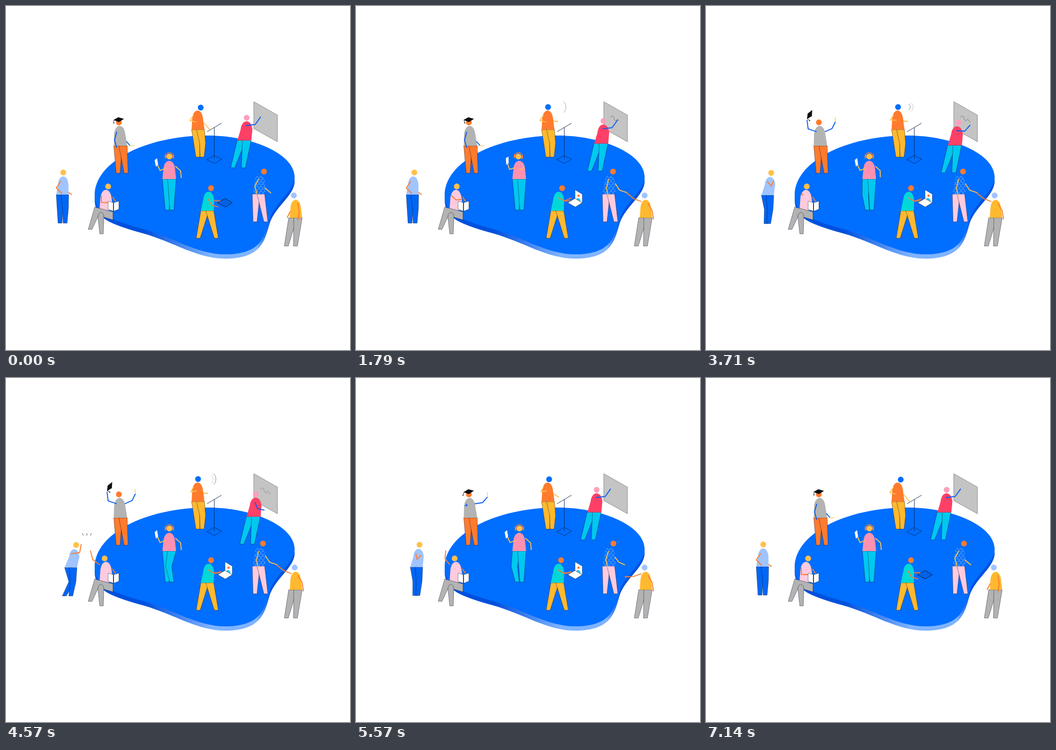
An HTML page with a canvas that plays this animation: 640x640 px, repeating every 7210 ms.

```html
<!DOCTYPE html>
<html lang="en">
<head>
<meta charset="utf-8">
<title>People around a shared space</title>
<style>
html, body { margin: 0; width: 100%; height: 100%; overflow: hidden; background: #fff; }
canvas { display: block; }
</style>
</head>
<body>
<canvas width="640" height="640"></canvas>
<script>
const ctx = document.querySelector('canvas').getContext('2d');
const LOOP = 7210, STEP = LOOP / 101, TAU = 2 * Math.PI;
const BLUE = '#006eff', ORANGE = '#ff7b2e', YELLOW = '#ffb92e', SKIN = '#ffc04a', GRAY = '#b3b3b3', CYAN = '#00c8f0',
  SLEEVE = '#0a5cf0', PALE_BLUE = '#a0c4ff', PALE_PINK = '#ffcadd', INK = 'rgba(10,20,50,.75)';
let t = 0;

// Motion: every gesture is a weight that eases in, holds and eases out.
function ease(from, to) {
  const p = Math.max(0, Math.min(1, (t - from) / (to - from)));
  return p * p * (3 - 2 * p);
}
const during = (inStart, inEnd, outStart, outEnd) => ease(inStart, inEnd) * (1 - ease(outStart, outEnd));
const wave = cycles => Math.sin(TAU * cycles * t / LOOP);
const mix = (a, b, w) => a.map((v, i) => v + (b[i] - v) * w);

// Drawing primitives
function paint(path, fill, stroke, width = .6) {
  if (fill) { ctx.fillStyle = fill; ctx.fill(path); }
  if (stroke) { ctx.strokeStyle = stroke; ctx.lineWidth = width; ctx.stroke(path); }
}

function track(pts) {
  const path = new Path2D();
  for (let i = 0; i < pts.length; i += 2) path.lineTo(pts[i], pts[i + 1]);
  return path;
}

const line = (pts, color, width = 1.8) => paint(track(pts), null, color, width);

function poly(pts, fill, stroke = INK, width) {
  const path = track(pts);
  path.closePath();
  paint(path, fill, stroke, width);
}

function dot(x, y, color, r = 5.4) {
  const path = new Path2D();
  path.arc(x, y, r, 0, TAU);
  paint(path, color);
}

function placed(x, y, angle, draw) {
  ctx.save();
  ctx.translate(x, y);
  ctx.rotate(angle);
  draw();
  ctx.restore();
}

// Body parts
function leg(hipLeft, hipRight, hip, foot, floor, knee, color) {
  const middle = (hip + floor) / 2, left = foot - 3.7, right = foot + 3.7;
  poly([hipLeft, hip, hipRight, hip, (hipRight + right) / 2 + knee, middle, right, floor,
    left, floor, (hipLeft + left) / 2 + knee, middle], color);
}

function legs(color, x, hip, width, floor, leftFoot, rightFoot, leftKnee = 0, rightKnee = 0) {
  leg(x - width / 2, x + width * .12, hip, leftFoot, floor, leftKnee, color);
  leg(x - width * .12, x + width / 2, hip, rightFoot, floor, rightKnee, color);
}

function torsoPath(x, hip, width, height, lean) {
  const shoulder = hip - height * .58, dome = hip - height * 1.14, half = width * .42, top = x + lean;
  return new Path2D(`M${x - width / 2} ${hip}L${top - half} ${shoulder}C${top - half + 2} ${dome}` +
    ` ${top + half - 2} ${dome} ${top + half} ${shoulder}L${x + width / 2} ${hip}Z`);
}
const torso = (color, ...body) => paint(torsoPath(...body), color);

// An arm is shoulder, hand and how far the elbow sticks out sideways.
function arm(color, [x, y, handX, handY, bend]) {
  const dx = handX - x, dy = handY - y, k = bend / (Math.hypot(dx, dy) || 1);
  line([x, y, (x + handX) / 2 - dy * k, (y + handY) / 2 + dx * k, handX, handY], color);
}

const reach = ([x, y, handX, handY, bend], dx, dy) => [x, y, handX + dx, handY + dy, bend];

const island = new Path2D('M165 352C165 290 260 241 375 241C460 241 537 276 537 318C537 345 500 365 490 398' +
  'C481 430 474 462 408 462C355 462 315 432 255 415C195 398 165 388 165 352Z');
const rim = ctx.createLinearGradient(165, 0, 537, 0);
[[.25, '#0050dd'], [.58, '#7fb4ff'], [.81, '#7fb4ff'], [.88, '#0052dd']]
  .forEach(([at, color]) => rim.addColorStop(at, color));

function ground() {
  placed(0, 8, 0, () => paint(island, rim));
  paint(island, BLUE);
}

function graduate() {
  const raise = during(2430, 2860, 5600, 6200), salute = during(2430, 2860, 5200, 5950);
  const doff = during(3000, 3500, 4700, 5200);
  legs(ORANGE, 213, 260, 25, 311, 208.7, 223.5);
  torso(GRAY, 213, 260, 25, 37, -1.5);
  dot(210, 216.5, ORANGE);
  arm(SLEEVE, reach(mix([206, 234, 206, 264, 4], [206, 234, 199, 212, -9], salute), -11 * doff, 0));
  const right = reach(mix([224, 252, 231, 260, 0], [221, 234, 245, 221, 5], raise), -4 * doff, -6 * doff);
  arm(SLEEVE, right);
  placed(right[2], right[3], -1.65 * raise, () => line([-1, 0, 8, 0], '#ffd27a', 1.6));
  placed(209.5 - 16.5 * doff, 211.5 - 9 * doff, -.1 * salute - .85 * doff, () => {
    const tip = -9 - 1.8 * wave(3);
    poly([-9.5, .5, -.5, -4.5, 10, -1.5, .5, 4.5], '#0a0f14', null);
    line([-8.5, .5, tip, 6], '#0a0f14', .8);
    dot(tip, 6, '#0a0f14', 1);
  });
}

function soundWaves(start, repeats) {
  const PERIOD = 650, since = t - start;
  if (since < 0 || since > repeats * PERIOD) return;
  for (let i = 0; i < 3; i++) {
    const age = since % PERIOD - i * 130, x = 377 + 4.5 * i, half = 5.8 + 2.3 * i, bulge = 4 + i;
    ctx.globalAlpha = Math.max(0, Math.min(1, age / 120, (400 - age) / 150));
    paint(new Path2D(`M${x} ${188 - half}c${bulge} ${half / 2} ${bulge} ${half * 1.5} 0 ${half * 2}`), null, '#777', .8);
  }
  ctx.globalAlpha = 1;
}

function speaker() {
  const gesture = during(3200, 4000, 5600, 6300), turn = during(0, 900, 5000, 6300);
  legs(YELLOW, 357.3, 230, 24, 281, 357, 364.8, 0, 2.5);
  torso(ORANGE, 357.3, 230, 24, 35.5, -.8);
  dot(362.3 - 5 * turn, 189 - turn, BLUE);
  arm(SKIN, mix([349, 203, 354, 216, 10], [349, 202, 355, 210, 9.6], gesture));
  arm(SKIN, mix([368, 217, 379, 230, 0], [367, 214, 376, 215, 0], during(300, 1500, 5000, 6200)));
  line([374, 234, 401, 218], '#222c44', .9);
  line([387.5, 226, 387.5, 285], '#0a2a66', .9);
  poly([373.5, 286, 387, 278, 401, 285, 388, 293], null, '#0a2a66', .8);
  soundWaves(590, 3);
  soundWaves(3450, 2);
}

const scribble = new Path2D('M473 207C477 203 479 204 480 209C481 214 484 215 486 211C489 209 488 216 492 216');

function presenter() {
  poly([461, 178, 505, 203, 505, 252.5, 461, 228], '#c4c4c4', '#888', .9);
  ctx.save();
  ctx.globalAlpha = 1 - ease(4300, 5100);
  ctx.setLineDash([40 * ease(600, 2600), 99]);
  if (t > 640) paint(scribble, null, '#777', .9);
  ctx.restore();
  const step = 19.5 * during(250, 2800, 4300, 5500);
  placed(step, step * .47, 0, () => {
    legs(CYAN, 443, 250, 26, 301, 421.7, 441.7);
    torso('#ff4066', 443.5, 250, 26, 35.5, 4);
    dot(447.7 + 2.5 * during(2200, 2800, 3500, 4400), 208, '#ff9fbc');
    arm(SLEEVE, mix([446, 222.5, 474, 206, 7.2], [446, 223, 464, 238, 6], during(3500, 4000, 4700, 5400)));
  });
}

function listener() {
  const tap = during(1000, 2500, 3200, 3700);
  const sway = during(3400, 3800, 5700, 6200) * Math.cos(TAU * (t - 4570) / 2000);
  legs(CYAN, 303.7, 322, 25.5, 379.5, 300, 308.6, 5 * Math.min(0, sway), -6 * Math.max(0, sway));
  torso('#ff91b0', 303.7, 322, 25.5, 34, 0);
  placed(304 - 3.5 * tap, 280, .25 * tap, () => {
    dot(0, 0, SKIN);
    paint(new Path2D('M-7.300 0A7.300 7.300 0 0 1 7.300 0'), null, ORANGE, 1.3);
    for (const x of [-7, 7]) line([x, -3.5, x, 3.5], ORANGE, 3);
  });
  arm(SKIN, mix([297, 302, 282, 296, -7.6], [296, 300, 282, 291, -7.8], tap));
  arm(SKIN, mix([315, 298, 326, 320, -4.9], [310, 296, 284, 290, -4], tap));
  placed(280 + 3 * tap, 291 - 6 * tap, .25 * tap, () => poly([-3.5, -4, 1, -8, 3, 4, -1, 8], '#fff', null));
}

function laptopUser() {
  const open = during(900, 1500, 5650, 6300), fold = (1 - open) ** 1.5;
  legs(YELLOW, 374.5, 381, 24, 432, 357.5, 391.3);
  torso('#00d8d8', 374.5, 381, 24, 35.5, 2.5);
  dot(381.5 + 2 * during(1000, 1700, 1900, 2700), 339, ORANGE);
  if (open) poly([394, 366, 407.5, 358, 421, 366, 408, 374], '#fff', '#222');
  poly([407.5, 358, 407.5 - 14 * fold, 342 + 24 * fold, 421 - 13 * fold, 350 + 24 * fold, 421, 366],
    open > .4 ? '#fff' : '#0062e6', '#10203c', .5 + .4 * fold);
  if (open > .95) {
    paint(new Path2D('M410.500 359.500C411 355.500 417 357 418 363.500Z'), CYAN);
    dot(414, 353, ORANGE, 2.2);
  }
  const typing = reach([376, 357, 401, 359, 5.5], 0, 2 * wave(7));
  arm(ORANGE, mix([376, 359, 395, 374, 5], typing, during(200, 1500, 5650, 6400)));
  arm(ORANGE, [386, 362.5, 399, 362.5, 0]);
}

function scales(x, y, width, height) {
  const R = 3.5, path = new Path2D();
  for (let row = 0; row * 4.5 < height; row++)
    for (let cx = x + row % 2 * R; cx < x + width; cx += 2 * R) {
      path.moveTo(cx - R, y + row * 4.5);
      path.arc(cx, y + row * 4.5, R, Math.PI, 0, true);
    }
  paint(path, null, 'rgba(160,200,255,.75)', .7);
}

function greeter() {
  const shake = during(200, 790, 5100, 6200);
  legs(PALE_PINK, 469.7, 350, 23, 401.5, 463.3, 483.5);
  ctx.save();
  ctx.clip(torsoPath(471, 350, 24, 36, 1));
  ctx.fillStyle = BLUE;
  ctx.fillRect(455, 310, 32, 40);
  scales(457, 316, 32, 34);
  ctx.restore();
  dot(480 - 1.8 * shake, 308, ORANGE);
  arm(SKIN, mix([470, 322, 467, 350, 5.5], [470, 322, 469, 355, 3.5], shake));
  arm(SKIN, mix([481, 338, 493, 348, 0], [482, 330, 505, 347.5, 5], shake));
}

function visitor() {
  const greet = during(200, 790, 5600, 6300), drop = during(4900, 5500, 5600, 6300);
  legs(GRAY, 538.5, 394, 25, 446.5, 521.5, 538.5);
  torso(YELLOW, 539.5, 394, 23, 33.5, -.5);
  dot(535.5 + 1.5 * greet, 352.5, PALE_BLUE);
  arm(ORANGE, reach(mix([529, 382, 523, 394, 0], [531, 364, 504, 348, -2.5], greet), -4 * drop, 22 * drop));
  arm(ORANGE, mix([543, 367, 543, 399, -2.5], [543, 367, 553.5, 397, -3], greet));
}

const clap = () => during(4150, 4400, 4400, 4570);

function walker() {
  const near = during(2600, 4400, 4600, 6500), stride = during(4000, 4400, 4700, 5200);
  placed(15.5 * near, 1.5 * near, 0, () => {
    legs('#0066f5', 105, 351, 23, 404, 100.5 + 2.5 * near - 10 * stride, 110 - 5 * near,
      5 * near + 5 * stride, 1 + near);
    torso(PALE_BLUE, 105, 351, 23, 34, 1.5 + 5 * near);
  });
  dot(106.5 + 24 * near + 2 * during(0, 790, 2000, 2600), 309.7 + near, SKIN);
  arm(ORANGE, reach(mix([102, 326, 104, 349, 9.5], [121, 327, 140, 309, 9.5], near), 8 * clap(), -8 * clap()));
  if (near < .05) line([116, 347, 122.5, 351], ORANGE);
}

function reader() {
  const turnPage = during(300, 1000, 1900, 2600), raise = during(3300, 4100, 5600, 6300);
  torso(PALE_PINK, 186.5, 380, 25, 38, -.5);
  paint(new Path2D('M165 374L199 383V398L172 390L160 415.500H153Z'), GRAY, INK);
  paint(new Path2D('M171 393C171 381 182 381 182 393L181 424H174.500Z'), GRAY, INK);
  dot(190 - 6.5 * raise - 2.5 * turnPage, 335.7, SKIN);
  const reading = mix([177, 352, 191, 366, 9], [177, 352, 198, 360, 5], turnPage);
  const greeting = reach([175, 348, 157, 321, -5.6], 10 * ease(4600, 5500) - 6 * clap(), -18 * clap());
  arm(ORANGE, mix(reading, greeting, raise));
  line([198, 355, 204, 364], ORANGE);
  for (const x of [190, 210]) poly([x, 363, 200, 366, 200, 382, x, 378], '#fff');
  line([200, 366, 200, 382], '#111', 1.2);
}

function clapMarks() {
  if (t < 4400 || t > 4720) return;
  for (const side of [-1, 0, 1]) line([150.5 + 8.5 * side, 289, 150.5 + 6.5 * side, 293], '#444', .9);
}

function frame(now) {
  t = Math.floor(now % LOOP / STEP) * STEP;
  ctx.clearRect(0, 0, 640, 640);
  for (const draw of [ground, graduate, speaker, presenter, listener, laptopUser, greeter, visitor,
    walker, reader, clapMarks]) draw();
  requestAnimationFrame(frame);
}
requestAnimationFrame(frame);
</script>
</body>
</html>
```
